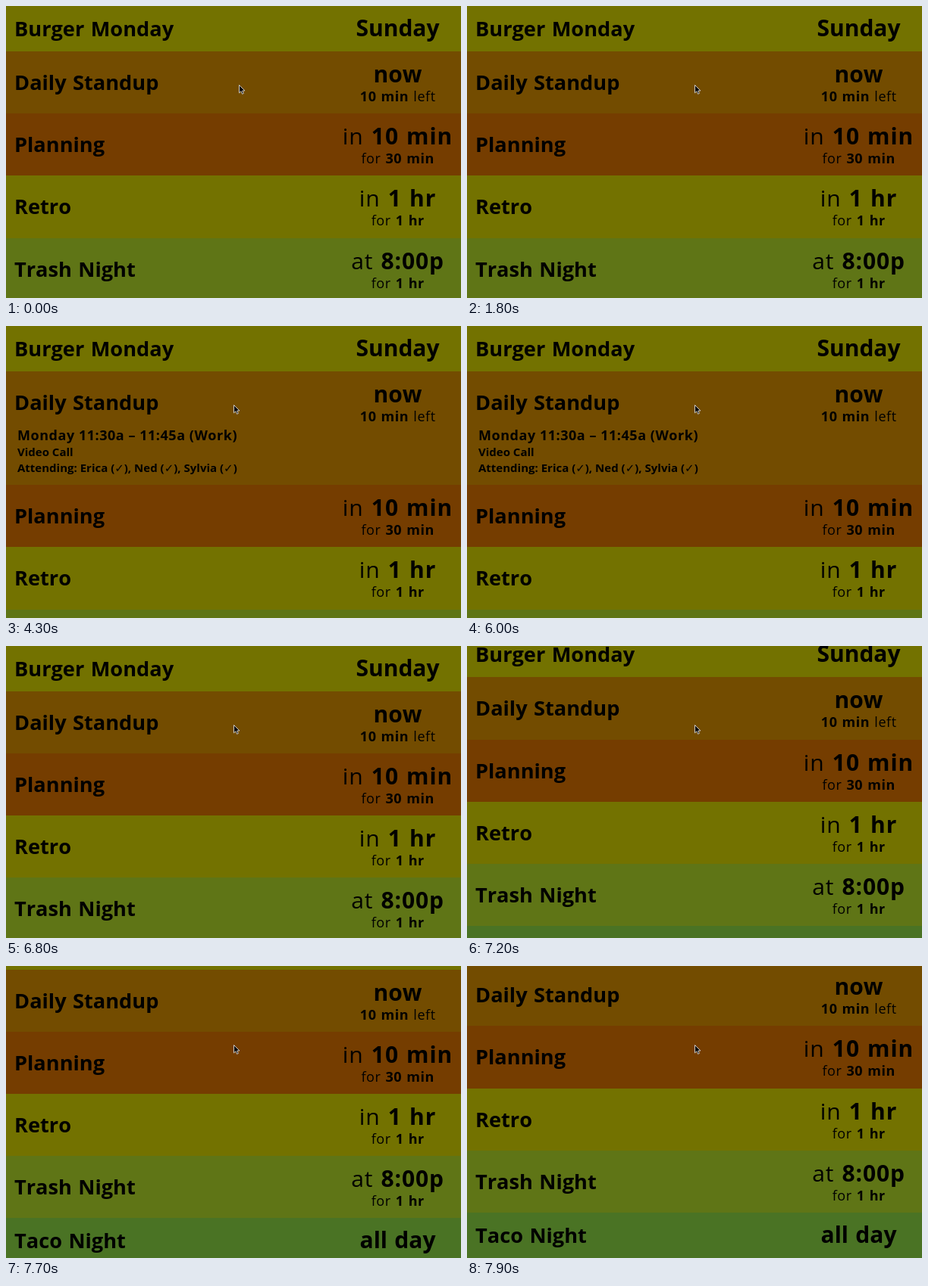
An HTML page for the animation above (8 s loop, 600 px wide and 386 px high).

```html
<!DOCTYPE html>
<html lang="en">
<head>
<meta charset="utf-8">
<title>Agenda</title>
<style>
html, body { margin: 0; width: 100%; height: 100%; overflow: hidden; background: #4a7324; }
svg { display: block; width: 600px; height: 386px; }
text { font: 700 27.2px "Open Sans", "DejaVu Sans", sans-serif; font-kerning: none; word-spacing: .05em; white-space: pre; }
rect { shape-rendering: crispEdges; }
.big, .small { text-anchor: middle; }
.big { font-size: 30px; }
.small { font-size: 18px; }
.time { font-weight: 400; letter-spacing: .03em; }
.time tspan { font-weight: 700; }
.when { font-size: 18px; letter-spacing: .03em; word-spacing: 0; }
.note { font-size: 15px; word-spacing: 0; }
</style>
</head>
<body>
<svg viewBox="0 0 600 386">
  <g id="list"></g>
  <path id="cursor" d="M0 0V10.4L2.4 8.2 4 11.8 5.8 11 4.2 7.5H7.4Z" fill="#000" stroke="#ddd" stroke-width=".9"/>
</svg>
<script>
const LOOP = 8000, STEP = 100;
const OPEN_AT = 2800, CLOSE_AT = 6100;
const SHORT = 60, TALL = 82.2, EXTRA = 68, SCROLL = 63.5;

// Asterisks mark the bold part of a time.
const rows = [
  { title: "Burger Monday", big: "Sunday", color: "#737200" },
  { title: "Daily Standup", big: "now", small: "*10 min* left", color: "#734c00",
    details: ["Monday 11:30a – 11:45a (Work)", "Video Call",
              "Attending: Erica (✓), Ned (✓), Sylvia (✓)"] },
  { title: "Planning", big: "in *10 min*", small: "for *30 min*", color: "#753d00" },
  { title: "Retro", big: "in *1 hr*", small: "for *1 hr*", color: "#737200" },
  { title: "Trash Night", big: "at *8:00p*", small: "for *1 hr*", color: "#5f7516" },
  { title: "Taco Night", big: "all day", color: "#4a7324" }
];

const list = document.getElementById("list");
const cursor = document.getElementById("cursor");

const text = (x, y, cls, s) =>
  `<text x="${x}" y="${y}" class="${cls}">${s.replace(/\*(.+?)\*/g, "<tspan>$1</tspan>")}</text>`;

function rowMarkup({ title, big, small, color, details = [] }) {
  const notes = details.map((s, i) =>
    text(15, 90.5 + 21 * i, i ? "note" : "when", s)).join("");
  return `<g><rect width="600" height="${small ? TALL + EXTRA : SHORT + 4}" fill="${color}"/>` +
    text(11, small ? 51 : 40, "", title) +
    text(516.5, small ? 41 : 39.5, big.includes("*") ? "big time" : "big", big) +
    (small ? text(516.7, 66, "small time", small) : "") +
    `<g class="details">${notes}</g></g>`;
}

list.innerHTML = rows.map(rowMarkup).join("");
const groups = [...list.children];
const details = groups[1].querySelector(".details");

function ease(t, from, to) {
  const u = Math.min(1, Math.max(0, (t - from) / (to - from)));
  return u * u * (3 - 2 * u);
}

function draw(t) {
  const open = t >= OPEN_AT && t < CLOSE_AT;
  let y = -SCROLL * ease(t, 6770, 7970);
  rows.forEach((row, i) => {
    groups[i].setAttribute("transform", `translate(0 ${Math.round(y)})`);
    y += row.small ? TALL : SHORT;
    if (row.details && open) y += EXTRA;
  });
  details.style.display = open ? "" : "none";
  cursor.setAttribute("transform", `translate(${307.5 - 7 * ease(t, 0, 1800)} 104.5)`);
}

const start = performance.now();
function tick() {
  const t = (performance.now() - start) % LOOP;
  draw(Math.floor(t / STEP) * STEP);
  requestAnimationFrame(tick);
}
tick();
</script>
</body>
</html>
```
